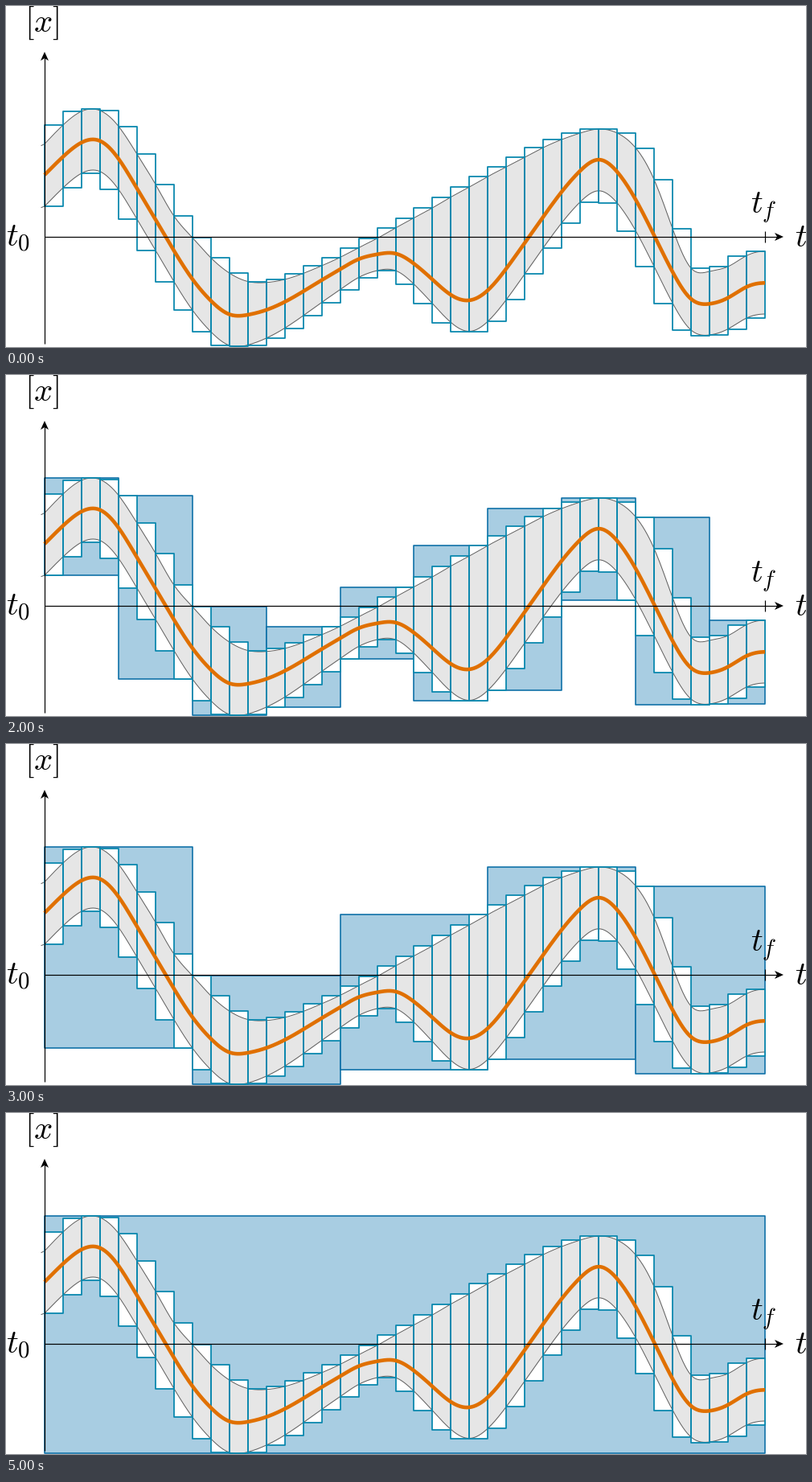
Recreate the animation shown at these times as a matplotlib script. Size 995x424 px, loop 6000 ms.

```python
import numpy as np
import matplotlib.pyplot as plt
from matplotlib.animation import FuncAnimation
from matplotlib.collections import PolyCollection

W, H, DPI = 995, 424, 64  # a power of two keeps the pixel size exact
X0, X1, AXIS_Y = 48, 944, 287
SIZES = [0, 2, 4, 8, 16, 64]  # slices merged into one hull at each step

TEAL, BLUE, PALE = "#0a88ae", "#0a6ea6", "#a8cde2"
GREY, ORANGE = "#e6e6e6", "#e07000"

# Interval bounds of each slice, in pixels from the top
TOPS = np.array([
    148, 131, 127.5, 130, 149.5, 184, 221.5, 261, 288, 313, 332, 342.5, 340,
    332.5, 323, 312.5, 300.5, 289, 276, 263.5, 251, 237.5, 225, 212, 200, 188,
    176, 166, 158, 153, 153, 158, 176.5, 216, 277, 326, 324, 310.5, 305])
BOTTOMS = np.array([
    249, 226, 208, 228, 265, 303.5, 342.5, 378, 405, 422, 423, 421.5, 413,
    400.5, 385, 368.5, 352.5, 337.5, 329, 346, 370, 393.5, 404.5, 404.5, 392,
    365, 333, 300.5, 269.5, 243.5, 245, 279.5, 324, 369.5, 403, 409.5, 409,
    401.5, 388])
N = len(TOPS)
EDGES = np.linspace(X0, X1, N + 1)


def px(width):
    return width * 72 / DPI


def spline(y, steps=16):
    """C2 cubic through evenly spaced knots, flat at the right end."""
    n = len(y)
    a = 4 * np.eye(n) + np.eye(n, k=1) + np.eye(n, k=-1)
    b = np.zeros(n)
    b[1:-1] = 3 * (y[2:] - y[:-2])
    a[0, :2], b[0] = (2, 1), 3 * (y[1] - y[0])
    a[-1, -2:] = 0, 1
    m = np.linalg.solve(a, b)
    u = np.linspace(0, n - 1, (n - 1) * steps + 1)
    i = np.minimum(u.astype(int), n - 2)
    t = u - i
    return ((1 + 2 * t) * (1 - t) ** 2 * y[i] + t * (1 - t) ** 2 * m[i]
            + t * t * (3 - 2 * t) * y[i + 1] + t * t * (t - 1) * m[i + 1])


def box(x0, x1, top, bottom):
    return [(x0, top), (x1, top), (x1, bottom), (x0, bottom)]


def hulls(size):
    if not size:
        return []
    out = []
    for i in range(0, N, size):
        j = min(i + size, N)
        out.append(box(EDGES[i], EDGES[j], TOPS[i:j].min(), BOTTOMS[i:j].max()))
    return out


# The tube meets the slice bounds at the slice edges
upper = np.r_[171.5, np.maximum(TOPS[:-1], TOPS[1:]), 305]
upper[[12, 36]] = 343.8, 330
lower = np.r_[249, np.minimum(BOTTOMS[:-1], BOTTOMS[1:]), 383]
lower[[3, 30]] = 205.8, 229.8
gap = np.interp(EDGES, [48, 108, 290, 473, 577], [39, 38, 38.7, 19, 38.7])

top, low, mid = spline(upper), spline(lower), spline(lower - gap)
xs = np.linspace(X0, X1, len(top))

plt.rcParams["mathtext.fontset"] = "cm"
fig = plt.figure(figsize=(W / DPI, H / DPI), dpi=DPI, facecolor="white")
ax = fig.add_axes([0, 0, 1, 1])
ax.set_xlim(0, W)
ax.set_ylim(H, 0)
ax.axis("off")

merged = PolyCollection([], facecolor=PALE, edgecolor=BLUE,
                        linewidth=px(1.6), zorder=1)
ax.add_collection(merged)

slices = [box(*s) for s in zip(EDGES[:-1], EDGES[1:], TOPS, BOTTOMS)]
ax.add_collection(PolyCollection(slices, facecolor="white", edgecolor="none",
                                 zorder=2))
ax.fill_between(xs, top, low, color=GREY, linewidth=0, zorder=3)
for curve, start in ((top, 173.5), (low, 250.5)):
    ax.plot(np.r_[44, xs], np.r_[start, curve], color="#606060",
            lw=px(1), zorder=4)
ax.add_collection(PolyCollection(slices, facecolor="none", edgecolor=TEAL,
                                 linewidth=px(1.8), zorder=5))
ax.plot(xs, mid, color=ORANGE, lw=px(4.6), solid_capstyle="butt", zorder=6)

# Axes with notched arrow tips
line = dict(color="black", lw=px(1.2), solid_capstyle="butt", zorder=7)
ax.plot([X0, 962], [AXIS_Y, AXIS_Y], **line)
ax.plot([X0, X0], [420, 62], **line)
ax.plot([X1, X1], [280, 294], **line)
tip = np.array([(0, 0), (-11, -5), (-8, 0), (-11, 5)])
ax.fill(*(tip + (967, AXIS_Y)).T, color="black", lw=0, zorder=7)
ax.fill(*(tip[:, ::-1] * (1, -1) + (X0, 57)).T, color="black", lw=0, zorder=7)

for x, y, label in ((23, 32, "$[x]$"), (0, 299, "$t_0$"),
                    (926, 258, "$t_f$"), (981, 299, "$t$")):
    ax.text(x, y, label, fontsize=px(41), ha="left", va="baseline", zorder=8)


def update(step):
    merged.set_verts(hulls(SIZES[step]))
    return (merged,)


anim = FuncAnimation(fig, update, frames=len(SIZES), interval=1000,
                     repeat=True, repeat_delay=0, blit=False)
plt.show()
```
